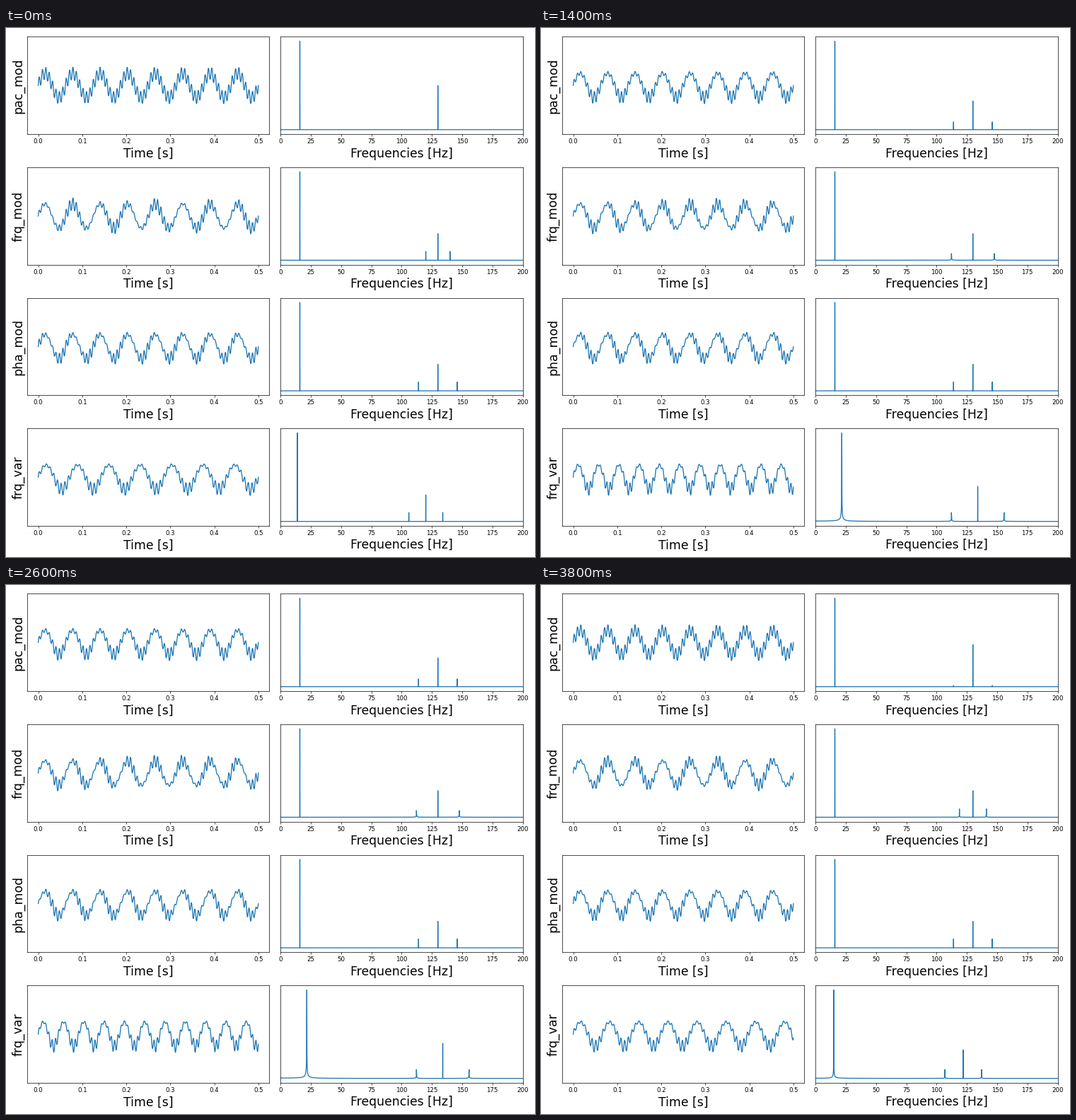
Recreate the animation shown at these times as a matplotlib script. Size 748 by 748 pixels, loop 4 s.

```python
import numpy as np
import matplotlib.pyplot as plt
from matplotlib.animation import FuncAnimation

SIZE = 748
STEPS = 10          # steps from one end of each sweep to the other
RATE = 2000         # samples per second
SECONDS = 8
T = np.arange(SECONDS * RATE) / RATE
FREQS = np.fft.rfftfreq(len(T), 1 / RATE)
SHOWN = T <= 0.5
NAMES = ["pac_mod", "frq_mod", "pha_mod", "frq_var"]

plt.rcParams["font.family"] = "DejaVu Sans"


def coupled(slow=16, mod=16, fast=130, chi=0.2, phase=np.pi):
    """Slow wave plus a fast wave whose amplitude follows a modulator."""
    envelope = ((1 - chi) * np.sin(2 * np.pi * mod * T + phase) + 1 + chi) / 4
    return (np.sin(2 * np.pi * slow * T)
            + envelope * np.sin(2 * np.pi * fast * T))


def signals(u):
    """The four signals at sweep position u in 0..1."""
    slow = 14 + 11 * u
    return [
        coupled(chi=1 - u),
        coupled(mod=10 + 11 * u),
        coupled(phase=0.75 * np.pi * (1 + u)),
        coupled(slow=slow, mod=slow, fast=120 + 20 * u),
    ]


fig = plt.figure(figsize=(12, 12), dpi=SIZE / 12, facecolor="white")


def panel(x, row, xlabel, xlim, ticks):
    w, h = 342.45, 137.6
    top = 12.4 + 184.65 * row
    ax = fig.add_axes([x / SIZE, 1 - (top + h) / SIZE, w / SIZE, h / SIZE])
    ax.set_xlim(*xlim)
    ax.set_xticks(ticks)
    ax.set_yticks([])
    ax.set_xlabel(xlabel, fontsize=20)
    line, = ax.plot([], [], color="#1f77b4", lw=1.5)
    return ax, line


rows = []
for i, name in enumerate(NAMES):
    wave_ax, wave = panel(30, i, "Time [s]", (-0.025, 0.525),
                          np.arange(6) / 10)
    wave_ax.set_ylim(-4, 4)
    wave_ax.set_ylabel(name, fontsize=20)
    spec_ax, spec = panel(388.1, i, "Frequencies [Hz]", (0, 200),
                          range(0, 201, 25))
    rows.append((wave, spec_ax, spec))


def update(n):
    u = 1 - abs(STEPS - n) / STEPS
    for (wave, spec_ax, spec), sig in zip(rows, signals(u)):
        wave.set_data(T[SHOWN], sig[SHOWN])
        level = np.abs(np.fft.rfft(sig))
        spec.set_data(FREQS, level)
        lo, hi = level.min(), level.max()
        margin = 0.05 * (hi - lo)
        spec_ax.set_ylim(lo - margin, hi + margin)
    return [line for wave, _, spec in rows for line in (wave, spec)]


anim = FuncAnimation(fig, update, frames=2 * STEPS, interval=200,
                     repeat=True, repeat_delay=0, blit=False)
plt.show()
```
